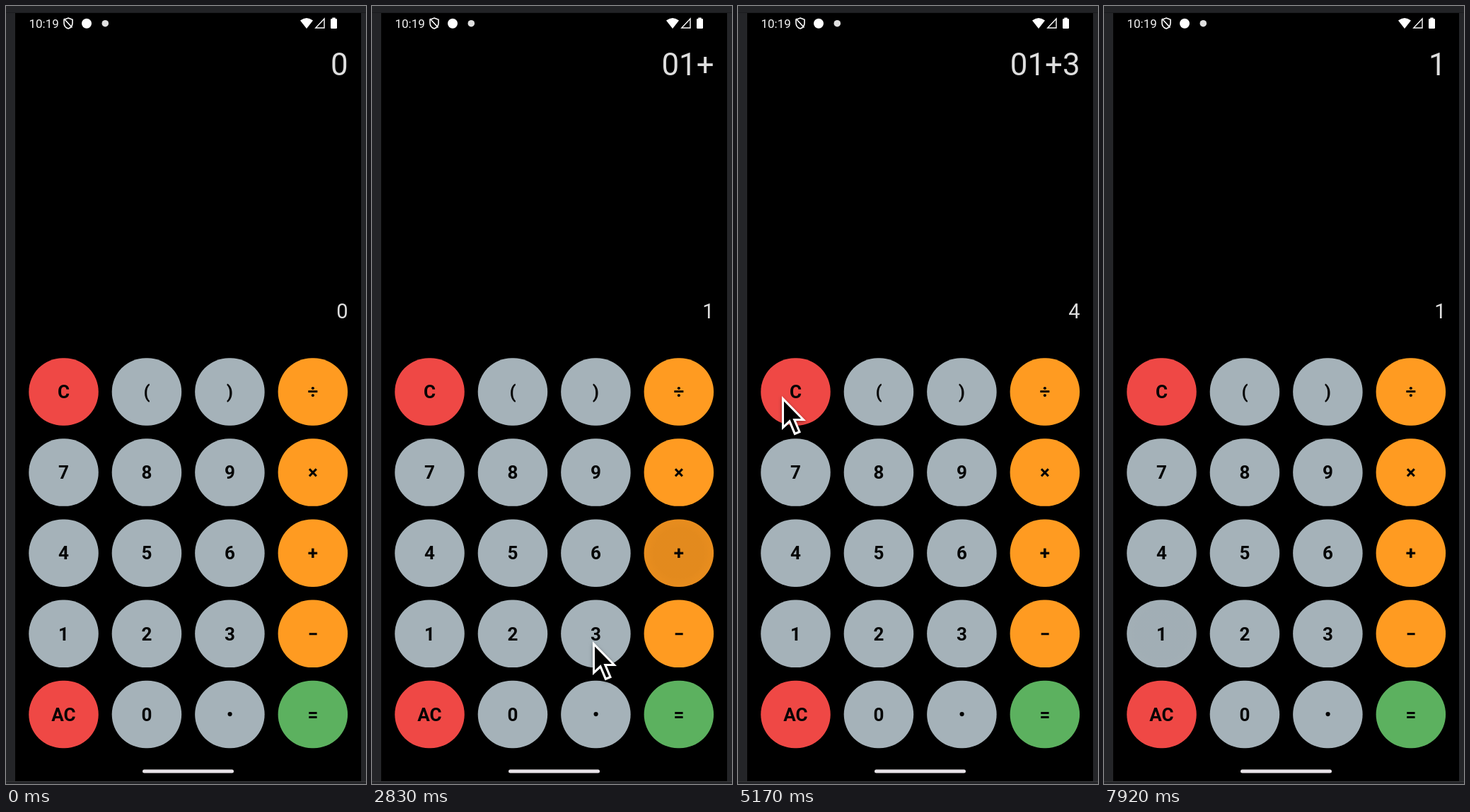
Recreate the animation shown at these times as an HTML page with a canvas. Size 509 by 1101 pixels, loop 8 s.

```html
<!DOCTYPE html>
<html lang="en">
<head>
<meta charset="utf-8">
<title>Calculator</title>
<style>
  html, body { margin: 0; width: 100%; height: 100%; overflow: hidden; background: #000; }
  canvas { display: block; width: 509px; height: 1101px; }
</style>
</head>
<body>
<canvas id="stage" width="509" height="1101"></canvas>
<script>
const ctx = document.getElementById('stage').getContext('2d');
const LOOP = 8000, FPS = 12;
const GREY = '#a5b2b9', RED = '#ef4845', ORANGE = '#ff9b21', GREEN = '#5cb15f';
const KEYS = ['C()÷', '789×', '456+', '123−', 'A0·='];
const KEY_W = 98.5, KEY_H = 95.5;

// time, key pressed
const PRESSES = [
  [1420, '1'], [2300, '+'], [3080, '3'],
  [5580, 'C'], [5770, 'C'], [5960, 'C'], [6190, 'C'], [7110, '1']
];
const TAP = 80;

// each stroke: points of time, x, y; the pointer hides while tapping
const STROKES = [
  { end: 1420, path: [[920, 262, 868], [1083, 168, 882], [1330, 74, 893]] },
  { end: 2300, path: [[1670, 74, 893], [2160, 420, 782]] },
  { end: 3080, path: [[2500, 420, 782], [2820, 312, 900]] },
  { end: 5580, path: [[3420, 312, 900], [3830, 400, 717], [4330, 400, 717], [5000, 62, 553]] },
  { end: 7110, path: [[6500, 62, 553], [6920, 74, 893]] }
];

const clamp = v => Math.max(0, Math.min(1, v));
const ease = v => v * v * (3 - 2 * v);
const mix = (a, b, v) => a + (b - a) * v;

function rect(x, y, w, h, color) {
  ctx.fillStyle = color;
  ctx.fillRect(x, y, w, h);
}

function pill(x, y, w, h, color) {
  ctx.beginPath();
  ctx.roundRect(x, y, w, h, Math.min(w, h) / 2);
  ctx.fillStyle = color;
  ctx.fill();
}

function dot(x, y, r, color) {
  ctx.beginPath();
  ctx.arc(x, y, r, 0, Math.PI * 2);
  ctx.fillStyle = color;
  ctx.fill();
}

function poly(points, color) {
  ctx.beginPath();
  points.forEach(([x, y]) => ctx.lineTo(x, y));
  ctx.closePath();
  ctx.fillStyle = color;
  ctx.fill();
}

function label(text, x, y, size, weight, color, align) {
  ctx.font = `${weight} ${size}px Roboto, sans-serif`;
  ctx.textAlign = align;
  ctx.fillStyle = color;
  ctx.fillText(text, x, y);
}

function drawFrame() {
  rect(0, 0, 509, 1101, '#242528');
  rect(0, 0, 509, 9, '#222326');
  rect(0, 9, 509, 1, '#1b1c1e');
  rect(13, 10, 489, 1087, '#000');
  rect(0, 1097, 509, 1, '#38393b');
  pill(193, 1080.5, 129, 5, '#e8e3e8');
}

function drawStatus() {
  label('10:19', 32.5, 30.5, 17, 400, '#f2f2f2', 'left');

  // crossed shield
  ctx.strokeStyle = '#fff';
  ctx.lineWidth = 1.6;
  ctx.beginPath();
  ctx.moveTo(88, 17);
  ctx.lineTo(94, 19.3);
  ctx.lineTo(94, 24);
  ctx.quadraticCurveTo(94, 30, 88, 32);
  ctx.quadraticCurveTo(82, 30, 82, 24);
  ctx.lineTo(82, 19.3);
  ctx.closePath();
  ctx.moveTo(82, 18);
  ctx.lineTo(93.5, 30.5);
  ctx.stroke();

  dot(114, 24.7, 7, '#fff');
  dot(140.3, 24.7, 4.8, '#e0e0e0');

  // wifi
  ctx.beginPath();
  ctx.moveTo(425, 32);
  ctx.lineTo(416, 20.5);
  ctx.quadraticCurveTo(425, 13.5, 434, 20.5);
  ctx.closePath();
  ctx.fillStyle = '#fff';
  ctx.fill();

  // signal
  ctx.lineWidth = 1.4;
  ctx.beginPath();
  ctx.moveTo(450, 18);
  ctx.lineTo(450, 31);
  ctx.lineTo(437.8, 31);
  ctx.closePath();
  ctx.stroke();

  // battery
  rect(461.3, 16.5, 4.4, 3, '#fff');
  ctx.beginPath();
  ctx.roundRect(459, 18, 9, 14, 1.3);
  ctx.fillStyle = '#fff';
  ctx.fill();
}

function readout(t) {
  let expr = '0', result = '0';
  for (const [at, key] of PRESSES) {
    if (t < at + TAP) break;
    if (key === 'C') {
      expr = expr.slice(0, -1);
    } else {
      expr += key;
      if (key !== '+') {
        result = String(expr.split('+').reduce((sum, n) => sum + Number(n), 0));
      }
    }
  }
  return [expr, result];
}

function drawReadout(t) {
  const [expr, result] = readout(t);
  label(expr, 483.5, 98, 43.8, 400, '#dedede', 'right');
  label(result, 483.5, 441.5, 29, 400, '#dedede', 'right');
}

function drawRipple(x, y, age) {
  const grow = ease(clamp(age / 450));
  const alpha = 0.12 * clamp(age / 75) * (1 - clamp((age - 500) / 375));
  const r = mix(18, 78, grow);
  const g = ctx.createRadialGradient(x, y, 0, x, y, r);
  g.addColorStop(0, `rgba(0,0,0,${alpha})`);
  g.addColorStop(0.45, `rgba(0,0,0,${alpha})`);
  g.addColorStop(0.65, `rgba(0,0,0,${alpha * 0.8})`);
  g.addColorStop(1, 'rgba(0,0,0,0)');
  pill(x - KEY_W / 2, y - KEY_H / 2, KEY_W, KEY_H, g);
}

function keyColor(key, col) {
  if (key === 'C' || key === 'A') return RED;
  if (key === '=') return GREEN;
  return col === 3 ? ORANGE : GREY;
}

function drawKeys(t) {
  KEYS.forEach((row, r) => [...row].forEach((key, c) => {
    const x = 81.5 + c * 117.45, y = 546 + r * 114.1;
    pill(x - KEY_W / 2, y - KEY_H / 2, KEY_W, KEY_H, keyColor(key, c));
    for (const [at, name] of PRESSES) {
      const age = t - at;
      if (name === key && age > 0 && age < 875) drawRipple(x, y, age);
    }
    if (key === '·') dot(x + 0.2, y - 0.3, 3.1, '#050505');
    else label(key === 'A' ? 'AC' : key, x, y + 9.2, 26, 700, '#050505', 'center');
  }));
}

function pointerAt(t) {
  const stroke = STROKES.find(s => t >= s.path[0][0] && t < s.end);
  if (!stroke) return null;
  const path = stroke.path;
  const next = path.findIndex(p => p[0] > t);
  if (next < 0) return path[path.length - 1].slice(1);
  const a = path[next - 1], b = path[next];
  const v = ease((t - a[0]) / (b[0] - a[0]));
  return [mix(a[1], b[1], v), mix(a[2], b[2], v)];
}

function drawPointer(t) {
  const pos = pointerAt(t);
  if (!pos) return;
  ctx.save();
  ctx.translate(pos[0], pos[1]);
  ctx.shadowColor = 'rgba(0,0,0,.4)';
  ctx.shadowBlur = 5;
  ctx.shadowOffsetY = 2;
  poly([[0, -1], [0, 47], [10.5, 37.5], [17.5, 54.5], [27, 50.5], [20, 34], [34, 34]], '#fff');
  ctx.shadowColor = 'transparent';
  poly([[3, 6.5], [3, 40], [11.5, 32], [19.2, 50.3], [23, 48.7], [15.4, 31], [27, 31]], '#000');
  ctx.restore();
}

function draw(now) {
  const step = Math.floor((now % LOOP) * FPS / 1000 + 0.05);
  const t = (step % (LOOP * FPS / 1000)) * 1000 / FPS;
  drawFrame();
  drawStatus();
  drawReadout(t);
  drawKeys(t);
  drawPointer(t);
}

let start = null;
function tick(now) {
  if (start === null) start = now;
  draw(now - start);
  requestAnimationFrame(tick);
}
draw(0);
requestAnimationFrame(tick);
</script>
</body>
</html>
```
